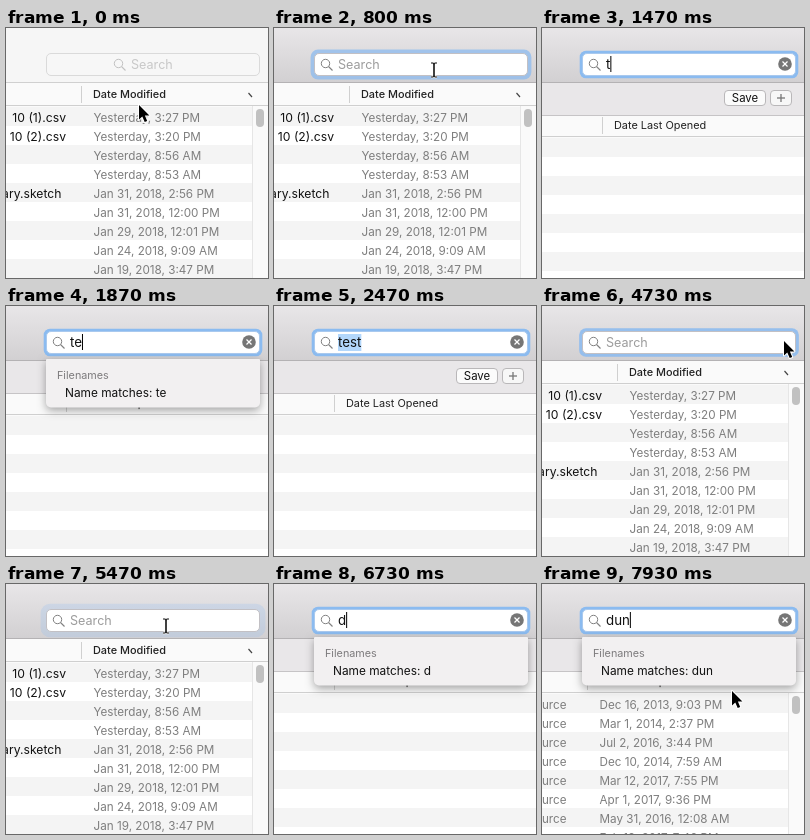
An HTML page with a canvas that plays this animation: 262 by 250 pixels, repeating every 8000 ms.

```html
<!DOCTYPE html>
<html lang="en">
<head>
<meta charset="utf-8">
<title>File search</title>
<style>
html, body { margin: 0; width: 100%; height: 100%; overflow: hidden; }
canvas { display: block; width: 262px; height: 250px; }
</style>
</head>
<body>
<canvas></canvas>
<script>
const W = 262, H = 250, LOOP = 8000, ROW = 19;
const canvas = document.querySelector('canvas');
const g = canvas.getContext('2d');
const dpr = window.devicePixelRatio || 1;
canvas.width = W * dpr;
canvas.height = H * dpr;

const recent = ['Yesterday, 3:27 PM', 'Yesterday, 3:20 PM', 'Yesterday, 8:56 AM',
  'Yesterday, 8:53 AM', 'Jan 31, 2018, 2:56 PM', 'Jan 31, 2018, 12:00 PM',
  'Jan 29, 2018, 12:01 PM', 'Jan 24, 2018, 9:09 AM', 'Jan 19, 2018, 3:47 PM'];
const files = { 0: ['10 (1).csv', 60], 1: ['10 (2).csv', 60], 4: ['ary.sketch', 55.5] };
const firstHits = ['Dec 10, 2014, 7:59 AM', 'Dec 10, 2014, 7:59 AM', 'Dec 10, 2014, 7:59 AM',
  'Dec 10, 2014, 7:59 AM', 'Apr 28, 2015, 10:03 AM', 'Apr 28, 2015, 10:03 AM',
  'Sep 29, 2015, 10:01 AM', 'Sep 29, 2015, 10:01 AM'];
const secondHits = ['Dec 16, 2013, 9:03 PM', 'Mar 1, 2014, 2:37 PM', 'Jul 2, 2016, 3:44 PM',
  'Dec 10, 2014, 7:59 AM', 'Mar 12, 2017, 7:55 PM', 'Apr 1, 2017, 9:36 PM',
  'May 31, 2016, 12:08 AM', 'Feb 12, 2017, 7:46 PM'];

// time, typed text
const typing = [[0, ''], [1400, 't'], [1800, 'te'], [1990, 'tes'], [2190, 'test'],
  [4600, ''], [6530, 'd'], [6870, 'du'], [7070, 'dun']];
// time, x, y of the pointer
const moves = [[0, 133, 77], [70, 133, 77], [650, 160, 42], [3470, 160, 42],
  [3930, 191, 43], [4400, 242, 35], [4870, 242, 35], [5330, 160, 42],
  [7470, 160, 42], [7930, 190, 107]];

const between = (t, a, b) => t >= a && t < b;
const ease = (t, a, b) => {
  const p = Math.min(1, Math.max(0, (t - a) / (b - a)));
  return p * p * (3 - 2 * p);
};

function rect(x, y, w, h, fill) {
  g.fillStyle = fill;
  g.fillRect(x, y, w, h);
}

function round(x, y, w, h, r, fill, stroke) {
  g.beginPath();
  g.roundRect(x, y, w, h, r);
  g.fillStyle = fill;
  g.fill();
  if (!stroke) return;
  g.strokeStyle = stroke;
  g.lineWidth = 1;
  g.stroke();
}

function line(points, color, width) {
  g.beginPath();
  points.forEach(([x, y]) => g.lineTo(x, y));
  g.strokeStyle = color;
  g.lineWidth = width;
  g.stroke();
}

function text(s, x, y, size, color, weight = 400, align = 'left') {
  g.font = `${weight} ${size}px Inter, "Liberation Sans", sans-serif`;
  g.textAlign = align;
  g.fillStyle = color;
  g.fillText(s, x, y + size * 0.36);
}

function fade(top, bottom, h) {
  const grad = g.createLinearGradient(0, 0, 0, h);
  grad.addColorStop(0, top);
  grad.addColorStop(1, bottom);
  return grad;
}

function toolbar(active) {
  rect(0, 0, W, 54, active ? fade('#e8e6e8', '#d2d0d2', 54) : '#f6f6f6');
  rect(0, 54, W, 1, active ? '#b4b2b4' : '#d0d0d0');
}

function list(top, split, title, weight, dates, row) {
  rect(0, top, W, H - top, '#fff');
  for (let i = 0; top + i * ROW < H; i += 2) rect(0, top + i * ROW, W, ROW, '#f4f4f4');
  rect(0, top - 24, W, 24, '#fafafa');
  rect(0, top - 2, W, 1, '#cfcfcf');
  rect(split, top - 21, 1, 17, '#d0d0d0');
  text(title, split + 12, top - 13, 10.9, '#222', weight);
  if (!dates) return;
  dates.forEach((d, i) => {
    const y = top + 10.7 + i * ROW;
    text(d, split + 12.5, y, 11.7, '#7e7e7e');
    row(i, y);
  });
  rect(246, top - 1, 16, H - top + 1, '#fafafa');
  rect(246, top - 1, 1, H - top + 1, '#e6e6e6');
  round(250, top + 2, 8, 18, 4, '#c1c1c1');
}

function browse() {
  list(79, 75, 'Date Modified', 500, recent, (i, y) => {
    if (files[i]) text(files[i][0], files[i][1], y, 12.2, '#111', 400, 'right');
  });
  line([[242.5, 65], [246, 69]], '#444', 1.2);
}

function results(dates) {
  list(110, dates ? 45 : 60, 'Date Last Opened', 400, dates,
    (i, y) => text('urce', 24.5, y, 11.7, '#7e7e7e', 400, 'right'));
  rect(0, 54, W, 33, '#e9e7e9');
  rect(0, 87, W, 1, '#c6c4c6');
  round(182.5, 62.5, 41, 15, 3.5, '#fbfbfb', '#b9b7b9');
  text('Save', 203, 70, 11.4, '#111', 400, 'center');
  round(228.5, 62.5, 21, 15, 3.5, '#f7f7f7', '#b9b7b9');
  line([[235, 70], [243, 70]], '#777', 1.3);
  line([[239, 66], [239, 74]], '#777', 1.3);
}

function field(t, query, focus, active) {
  if (focus > 0) {
    const grow = 3.3 + (1 - focus) * 4;
    g.globalAlpha = focus;
    round(41 - grow, 26 - grow, 212 + 2 * grow, 21 + 2 * grow, 3 + grow, '#8bbbf0');
    g.globalAlpha = 1;
  }
  const border = !active ? '#dadada' : focus === 1 ? '#a9c9ee' : '#c2c0c4';
  round(40.5, 25.5, 213, 22, 4.5, active ? '#fff' : '#f7f7f7', border);

  const slide = query ? 0 : 61 * (1 - ease(focus, 0, 0.15));
  const tint = active ? '#808080' : '#c2c2c2';
  g.beginPath();
  g.arc(51.5 + slide, 35.5, 4.2, 0, 7);
  g.strokeStyle = tint;
  g.lineWidth = 1;
  g.stroke();
  line([[54.5 + slide, 38.5], [58.5 + slide, 42.5]], tint, 1.1);

  if (!query) text('Search', 64 + slide, 36.5, 12.6, active ? '#9c9c9c' : '#c8c8c8');
  g.font = '400 13.3px Inter, "Liberation Sans", sans-serif';
  const end = 64 + g.measureText(query).width;
  if (between(t, 2470, 4600)) rect(64, 28, end - 64, 17, '#b3d7fb');
  else if (focus === 1) rect(end, 28, 1, 16, '#000');
  if (!query) return;
  text(query, 64, 36.5, 13.3, '#111');
  g.beginPath();
  g.arc(243, 36, 6.8, 0, 7);
  g.fillStyle = '#767676';
  g.fill();
  line([[240.5, 33.5], [245.5, 38.5]], '#fff', 1.3);
  line([[245.5, 33.5], [240.5, 38.5]], '#fff', 1.3);
}

function suggestions(query) {
  g.save();
  g.shadowColor = 'rgba(0,0,0,.35)';
  g.shadowBlur = 8 * dpr;
  g.shadowOffsetY = 3 * dpr;
  round(40, 53, 214, 48.5, [1, 1, 5, 5], '#f2f0f1');
  g.restore();
  text('Filenames', 51, 69, 10.8, '#7d7b7d');
  text('Name matches: ' + query, 59, 87, 11.85, '#111');
}

function pointer(t) {
  if (between(t, 1400, 3470) || between(t, 6530, 7470)) return;
  const n = moves.findIndex(m => m[0] > t);
  const b = moves.at(n);
  const a = n < 0 ? b : moves[n - 1];
  const p = a === b ? 1 : ease(t, a[0], b[0]);
  const x = a[1] + (b[1] - a[1]) * p, y = a[2] + (b[2] - a[2]) * p;
  g.save();
  g.translate(x, y);
  const overText = between(y, 26, 47) && x < 185 && (t < 1400 || between(t, 4900, 7500));
  if (overText) {
    for (const [color, w] of [['#fff', 2.4], ['#111', 1.1]]) {
      for (const side of [-1, 1]) {
        line([[3 * side, -7], [side, -7], [0, -5.5], [0, 5.5], [side, 7], [3 * side, 7]], color, w);
      }
    }
  } else {
    g.beginPath();
    [[0, 0], [0, 14.5], [3.3, 11.5], [5.7, 17], [8.2, 16], [5.9, 10.6], [10.4, 10.4]]
      .forEach(([px, py]) => g.lineTo(px, py));
    g.closePath();
    g.lineJoin = 'round';
    g.strokeStyle = '#fff';
    g.lineWidth = 2;
    g.stroke();
    g.fillStyle = '#000';
    g.fill();
  }
  g.restore();
}

function draw(t) {
  g.setTransform(dpr, 0, 0, dpr, 0, 0);
  const query = typing.filter(k => k[0] <= t).pop()[1];
  const active = t >= 670;
  const focus = t < 4600 ? ease(t, 670, 870)
    : t < 5330 ? 1 - ease(t, 4670, 4930) : ease(t, 5380, 5670);

  if (!query) browse();
  else if (t < 4600) results(t >= 2800 ? firstHits : null);
  else results(t >= 7470 ? secondHits : null);
  toolbar(active);
  field(t, query, focus, active);
  if (between(t, 1660, 2470) || t >= 6670) suggestions(query);
  pointer(t);
}

function tick() {
  draw(performance.now() % LOOP);
  requestAnimationFrame(tick);
}
tick();
</script>
</body>
</html>
```
